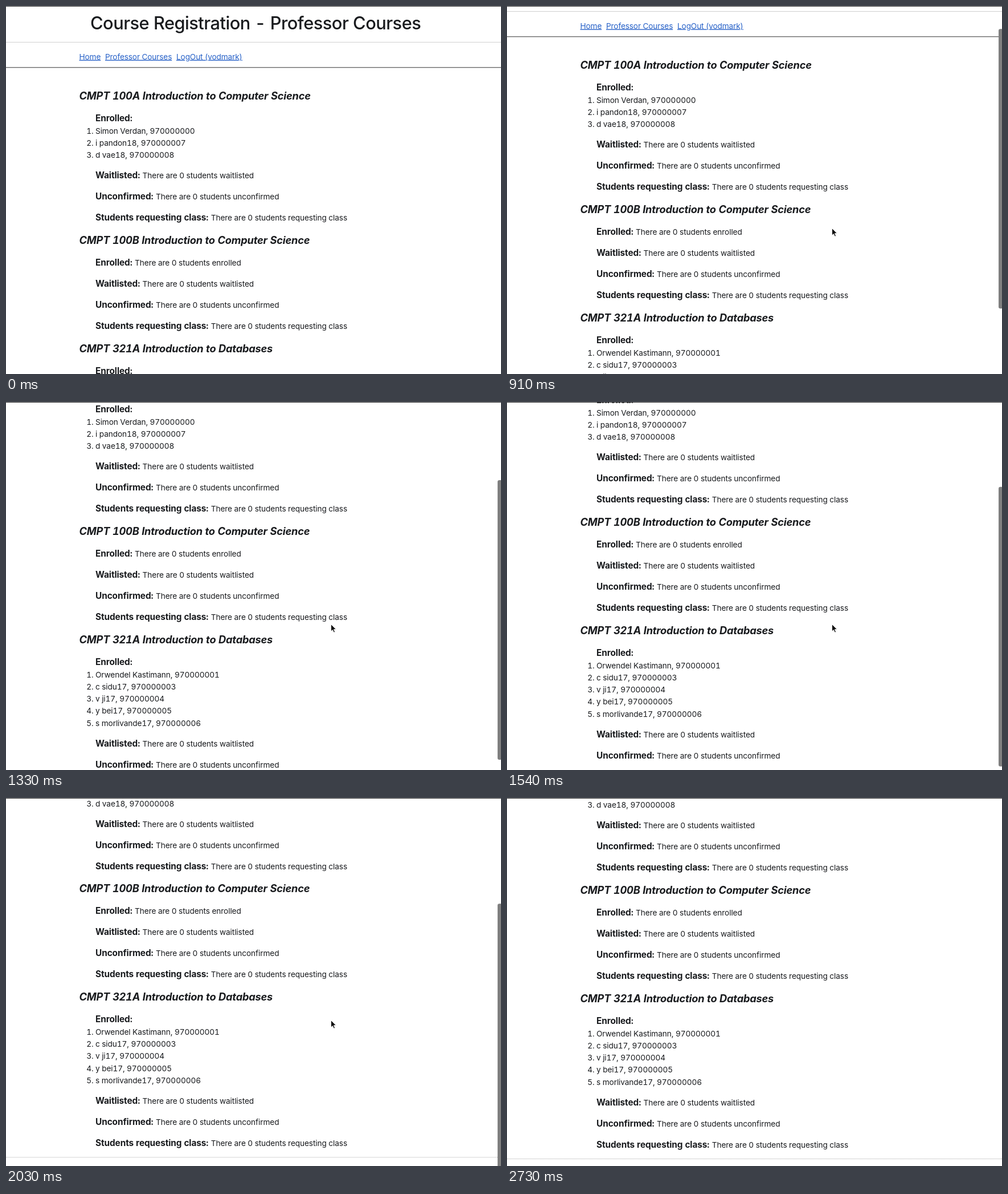
Recreate the animation shown at these times as an HTML page. Size 869x645 px, loop 3080 ms.

```html
<!DOCTYPE html>
<html lang="en">
<head>
<meta charset="utf-8">
<title>Course Registration</title>
<style>
  html, body { margin: 0; width: 100%; height: 100%; overflow: hidden; background: #fff; }
  svg { display: block; width: 869px; height: 645px; }
  text {
    font: 400 13.7px Inter, Roboto, sans-serif; font-variant-numeric: tabular-nums;
    letter-spacing: -.0085em; fill: #191b1e;
  }
  .title { font-size: 30.8px; font-weight: 500; letter-spacing: -.017em; }
  .course { font-size: 18.3px; font-weight: 700; font-style: italic; letter-spacing: -.0125em; }
  .label { font-size: 15.4px; font-weight: 700; letter-spacing: -.0065em; }
  .link { fill: #2862c8; text-decoration: underline; letter-spacing: -.0115em; }
  .num { text-anchor: end; }
</style>
</head>
<body>
<svg viewBox="0 0 869 645">
  <g id="page"></g>
  <rect width="869" height="1" fill="#333"/>
  <rect id="thumb" x="863" width="8" height="490" rx="3" fill="#7f7f7f"/>
  <path id="cursor" d="M0 0V12.6L2.9 9.9L5 14.6L7.1 13.7L5.1 9.1H9Z" fill="#111" stroke="#fff" stroke-width=".9"/>
</svg>
<script>
const STEP = 70, LOOP = 3080, END = 249;
const $ = id => document.getElementById(id);

const courses = [
  ['CMPT 100A Introduction to Computer Science',
    ['Simon Verdan, 970000000', 'i pandon18, 970000007', 'd vae18, 970000008']],
  ['CMPT 100B Introduction to Computer Science', []],
  ['CMPT 321A Introduction to Databases',
    ['Orwendel Kastimann, 970000001', 'c sidu17, 970000003', 'v ji17, 970000004',
     'y bei17, 970000005', 's morlivande17, 970000006']]
];

const text = (x, y, s, cls = '') => `<text x="${x}" y="${y}" class="${cls}">${s}</text>`;
const rule = (y, color, dash = '') =>
  `<path d="M0 ${y}H869" stroke="${color}" stroke-dasharray="${dash}"/>`;
const entry = (y, label, state) => text(157, y, `<tspan class="label">${label}:</tspan>` +
  (state ? `<tspan dx="4.4">There are 0 students ${state}</tspan>` : ''));

function buildPage() {
  let out = text(148, 41, 'Course Registration - Professor Courses', 'title') +
    rule(63.5, '#d0d0d0') +
    text(128.5, 93.5, 'Home', 'link') +
    text(174, 93.5, 'Professor Courses', 'link') +
    text(299, 93.5, 'LogOut (vodmark)', 'link') +
    rule(107.8, '#333');
  let y = 164;
  for (const [name, students] of courses) {
    out += text(128.5, y, name, 'course');
    y += 38;
    out += entry(y, 'Enrolled', students.length ? '' : 'enrolled');
    students.forEach((student, i) => {
      y += i ? 21.15 : 22;
      out += text(153.5, y, i + 1 + '.', 'num') + text(157, y, student);
    });
    y += students.length ? 36 : 37;
    out += entry(y, 'Waitlisted', 'waitlisted') +
      entry(y + 37, 'Unconfirmed', 'unconfirmed') +
      entry(y + 74, 'Students requesting class', 'requesting class');
    y += 74 + 40.8;
  }
  return out + rule(881.5, '#aaa', '1 1');
}

// Tracks are [time, value...] points, joined by straight lines.
const scroll = [[630, 0], [700, 2.6], [770, 12], [840, 30], [910, 54], [1120, 129.5],
  [1260, 170], [1330, 184], [1400, 188], [1470, 188], [1540, 200], [1610, 230],
  [1680, END], [1750, 252], [1890, END], [1960, END], [2030, 251.7], [2240, END]];
const pointer = [[70, 524, 490], [140, 556, 425], [210, 570.5, 389.5], [2100, 570.5, 389.5],
  [2240, 545, 440], [2380, 490, 560], [2520, 451, 626], [2590, 446, 631], [2660, 436, 639]];
const fade = [[2310, 1], [2520, 0]];

function at(track, t) {
  const i = track.findIndex(p => p[0] >= t);
  if (i < 0) return track[track.length - 1].slice(1);
  if (!i) return track[0].slice(1);
  const a = track[i - 1], b = track[i], k = (t - a[0]) / (b[0] - a[0]);
  return a.slice(1).map((v, j) => v + (b[j + 1] - v) * k);
}

function draw(now) {
  const t = Math.floor(now % LOOP / STEP) * STEP;
  const [top] = at(scroll, t), [x, y] = at(pointer, t);
  $('page').setAttribute('transform', `translate(0 ${-top})`);
  $('thumb').setAttribute('y', Math.min(top, END) * .744);
  $('thumb').setAttribute('opacity', t < 770 ? 0 : at(fade, t)[0]);
  $('cursor').setAttribute('transform', `translate(${x} ${y})`);
  $('cursor').setAttribute('opacity', t >= 70 && t < 2730 ? 1 : 0);
}

$('page').innerHTML = buildPage();
let start;
function tick(now) {
  start ??= now;
  draw(now - start);
  requestAnimationFrame(tick);
}
draw(0);
requestAnimationFrame(tick);
</script>
</body>
</html>
```
